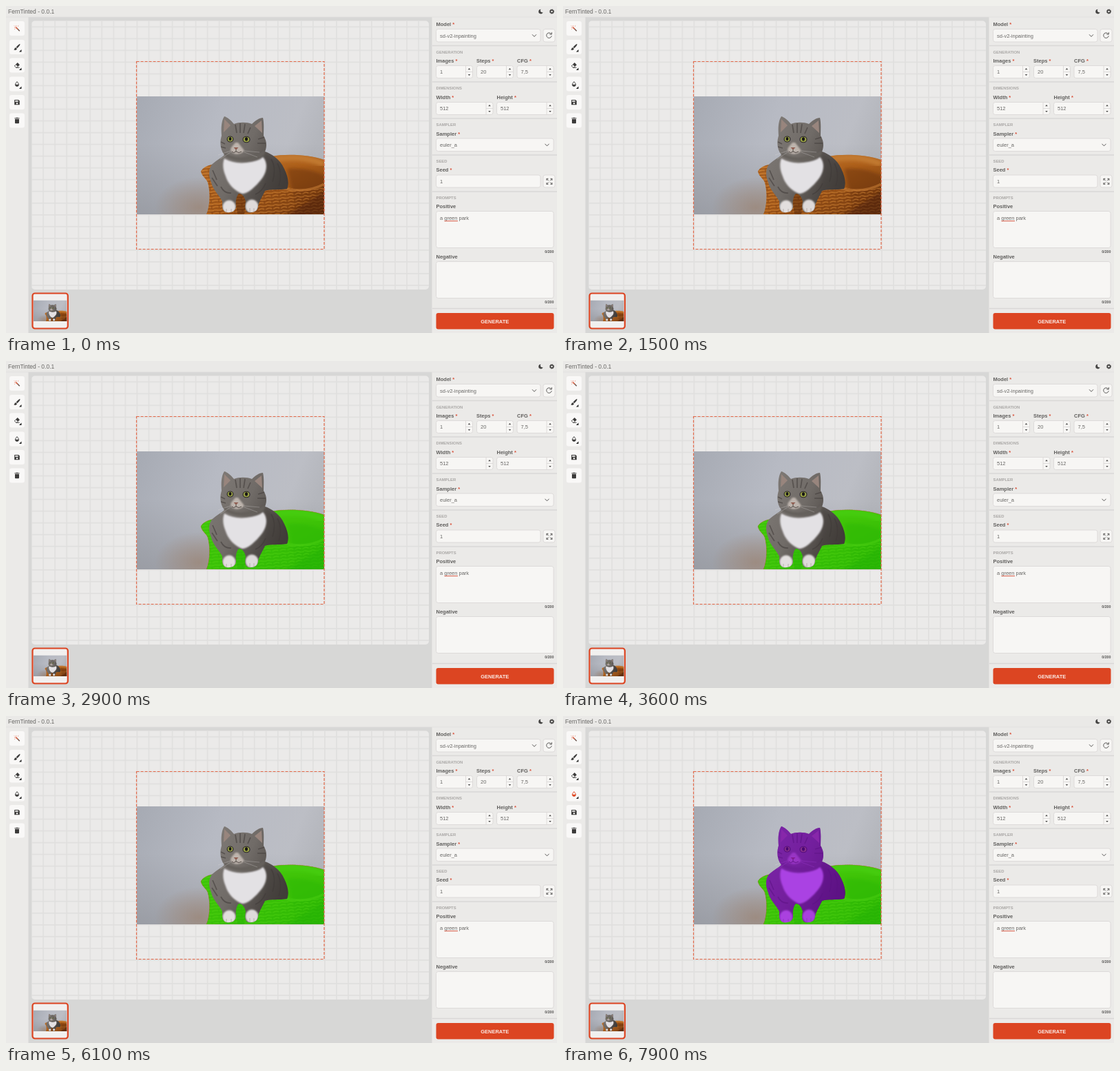
Write an HTML page that moves like this. It is 800 px wide and 474 px high and loops after 8 s.

```html
<!DOCTYPE html>
<html lang="en">
<head>
<meta charset="utf-8">
<title>Mask editor</title>
<style>
html, body { margin: 0; width: 100%; height: 100%; overflow: hidden; background: #ebeae8; }
svg { display: block; width: 100vw; height: 100vh; }
text { font: 7.5px "Liberation Sans", Arial, sans-serif; fill: #696866; }
.b { font-weight: bold; fill: #605f5d; }
.head { font-size: 5.9px; font-weight: bold; fill: #a9a7a5; }
.tiny { font-size: 5.3px; font-weight: bold; fill: #595857; text-anchor: end; }
.small { font-size: 6.4px; }
.mid { text-anchor: middle; }
.star { fill: #d9513a; }
.field { fill: #f7f6f4; stroke: #dbd9d7; stroke-width: .9; }
.line { fill: none; stroke: #5a5958; stroke-width: 1; stroke-linecap: round; stroke-linejoin: round; }
.hot { fill: #dc4522; }
.rule { stroke: #d9d8d6; stroke-width: 1.5; }
.ico { color: #3c3b3a; fill: currentColor; }

/* One loop: 8 s, 1.25% is 100 ms */
.brush, .drop, .popup, .green, .purple, .cursor, .pink, .violet, .lime { animation: 8s linear infinite; }
.brush { animation-name: brush; }
.drop { animation-name: drop; }
.popup { animation-name: popup; }
.green { animation-name: green; animation-timing-function: step-end; }
.purple { animation-name: purple; animation-timing-function: step-end; }
.cursor { animation-name: cursor; animation-timing-function: ease-in-out; }
.pink, .violet, .lime { transform-box: fill-box; transform-origin: center; animation-timing-function: step-end; }
.pink { animation-name: pink; }
.violet { animation-name: violet; }
.lime { animation-name: lime; }
@keyframes brush { 0%, 9% { color: #3c3b3a } 11%, 12.5% { color: #d6481f } 14.5%, 100% { color: #3c3b3a } }
@keyframes drop {
  0%, 46.9% { color: #3c3b3a } 49.5%, 70% { color: #e0451f } 72.5%, 96.25% { color: #3c3b3a } 98.75%, 100% { color: #e0451f }
}
@keyframes popup { 0%, 47% { opacity: 0 } 51%, 70% { opacity: 1 } 72.5%, 100% { opacity: 0 } }
@keyframes green { 0% { visibility: hidden } 35% { visibility: visible } }
@keyframes purple { 0% { visibility: hidden } 85% { visibility: visible } }
@keyframes cursor {
  0%, 20% { opacity: 0; transform: translate(210px, 180px) } 21% { opacity: 1; transform: translate(210px, 180px) }
  27.5%, 32.49% { opacity: 1; transform: translate(427px, 285px) } 32.5%, 100% { opacity: 0; transform: translate(427px, 285px) }
}
@keyframes pink { 0% { transform: none } 57.5% { transform: scale(1.12) } 60%, 100% { transform: none } }
@keyframes violet { 0% { transform: none } 60% { transform: scale(1.08) } 66.25%, 100% { transform: scale(1.14) } }
@keyframes lime { 0% { transform: scale(1.12) } 66.25%, 100% { transform: none } }
</style>
</head>
<body>
<svg viewBox="0 0 800 474" preserveAspectRatio="none">
<defs>
  <pattern id="grid" x="189.5" y="80.5" width="17.03" height="17.03" patternUnits="userSpaceOnUse">
    <path d="M0 .8H17.03M.8 0V17.03" stroke="#e0dfde" stroke-width="1.6"/>
  </pattern>
  <pattern id="weave" width="11" height="9" patternUnits="userSpaceOnUse" patternTransform="rotate(-5)">
    <path d="M0 2Q3 0 6 2T11 2M-3 6.5Q0 4.5 4 6.5T12 6" fill="none" stroke="#c67c33" stroke-width="1.7"/>
    <path d="M0 4.2Q5 3 11 4.2M0 8.5H11M8 0V4" fill="none" stroke="#6b300c" stroke-width="1"/>
  </pattern>
  <linearGradient id="wall" x2="1" y2=".25">
    <stop stop-color="#a6aab3"/><stop offset=".45" stop-color="#b7bac3"/><stop offset=".85" stop-color="#bcbec5"/><stop offset="1" stop-color="#b4b6bc"/>
  </linearGradient>
  <linearGradient id="shade" x2="0" y2="1">
    <stop offset=".4" stop-color="#85878d" stop-opacity="0"/><stop offset="1" stop-color="#85878d" stop-opacity=".5"/>
  </linearGradient>
  <radialGradient id="warm"><stop stop-color="#9b8474" stop-opacity=".75"/><stop offset=".5" stop-color="#9b8474" stop-opacity=".4"/><stop offset="1" stop-color="#9b8474" stop-opacity="0"/></radialGradient>
  <linearGradient id="wicker" x2="1" y2="1">
    <stop stop-color="#c0752c"/><stop offset=".5" stop-color="#ad5f1a"/><stop offset="1" stop-color="#6b340c"/>
  </linearGradient>
  <linearGradient id="fur" x2="1" y2=".6">
    <stop stop-color="#827d79"/><stop offset=".5" stop-color="#706b67"/><stop offset="1" stop-color="#3f3a37"/>
  </linearGradient>
  <filter id="soft" x="-30%" y="-30%" width="160%" height="160%"><feGaussianBlur stdDeviation="2.8"/></filter>
  <filter id="fuzz" x="-20%" y="-20%" width="140%" height="140%"><feGaussianBlur stdDeviation="1.3"/></filter>
  <filter id="cast" x="-20%" y="-20%" width="140%" height="140%"><feDropShadow dx="0" dy="1" stdDeviation="1.5" flood-opacity=".2"/></filter>
  <clipPath id="photoBox"><rect x="190" y="131" width="272" height="171"/></clipPath>

  <path id="rim" d="M302 229C291 231 284 236 283 240C285 248 291 250 293 256C297 270 296 290 291 302H462V223C440 215 405 214 386 218L340 240Z"/>
  <path id="shape" d="M313 188C312 176 313 166 317 160C321 161 327 166 331 171C338 168 350 168 357 171C362 166 368 162 373 162C375 170 374 180 374 188C380 198 378 206 376 211C385 214 398 222 404 236C410 248 411 258 408 265C395 267 385 265 376 268C373 275 368 282 366 290C366 298 358 300 352 299C346 297 347 290 348 283C346 276 343 272 338 272C335 275 333 282 334 290C334 297 328 300 320 299C313 297 314 290 314 283C310 275 300 266 298 256C294 246 294 238 298 231C304 224 312 221 317 216C311 208 310 198 313 188Z"/>
  <clipPath id="catClip"><use href="#shape"/></clipPath>
  <clipPath id="rimClip"><use href="#rim"/></clipPath>

  <g id="scene">
    <rect x="190" y="131" width="272" height="171" fill="url(#wall)"/>
    <rect x="190" y="131" width="272" height="171" fill="url(#shade)"/>
    <ellipse cx="280" cy="292" rx="64" ry="44" fill="url(#warm)"/>
    <use href="#rim" fill="url(#wicker)"/>
    <g clip-path="url(#rimClip)">
      <path d="M385 223Q425 214 462 229" fill="none" stroke="#c27a33" stroke-width="9" filter="url(#soft)"/>
      <path d="M408 236Q440 232 470 250V306H425Z" fill="#6d340d" opacity=".55" filter="url(#soft)"/>
      <path d="M283 232L302 230L302 258L340 265L410 263Q440 270 462 262V302H285Z" fill="url(#weave)" opacity=".6"/>
      <path d="M366 268Q390 262 412 266Q440 270 462 258" fill="none" stroke="#c67c35" stroke-width="3.5" opacity=".6"/>
      <path d="M400 306Q440 285 470 262V306Z" fill="#4f240a" opacity=".6" filter="url(#soft)"/>
      <path d="M332 272H350L346 302H336Z" fill="#4f240a" opacity=".45"/>
    </g>
  </g>
  <g id="cat">
    <use href="#shape" fill="url(#fur)"/>
    <g clip-path="url(#catClip)">
      <path d="M317 164L326 173L316 183ZM371 166L361 174L372 184Z" fill="#98857d"/>
      <path d="M374 212Q382 240 372 268H412Q412 235 374 212Z" fill="#45403d" opacity=".5" filter="url(#soft)"/>
      <path d="M333 172L335 184M340 170L340 184M347 171L345 184M355 176L351 185M366 193L376 190M365 199L377 199M312 197L318 200M312 204L319 206M300 238L306 252M299 249L307 261M385 222Q393 235 387 255M394 228Q402 243 396 261M377 257Q372 269 362 273M312 262Q317 272 327 271" fill="none" stroke="#3f3a37" stroke-width="1.700" opacity=".55"/>
      <path d="M317 221Q331 229 349 227T373 219C381 228 378 240 373 248C364 261 350 273 343 272C334 269 323 260 319 247C315 238 314 229 317 221Z" fill="#e3e1e4" filter="url(#fuzz)"/>
      <path d="M316 211Q338 229 377 209L374 216Q345 232 319 218Z" fill="#65605c" filter="url(#fuzz)"/>
      <path d="M333 198C329 203 324 207 327 211C331 216 341 216 346 210C344 206 339 201 337 198Z" fill="#bdb4ad" filter="url(#fuzz)"/>
      <ellipse cx="324" cy="291.500" rx="9.500" ry="10" fill="#e2dede" filter="url(#fuzz)"/>
      <ellipse cx="357" cy="290.500" rx="9.500" ry="10" fill="#dedada" filter="url(#fuzz)"/>
      <path d="M320 294V299M327 294V299M354 293V299M360 293V299" stroke="#afa5a2" stroke-width=".8"/>
      <path d="M330.500 205H337.500L334 208.500Z" fill="#8f5d50"/>
      <path d="M334 208V211Q330 214 328 211M334 211Q338 214 342 211" fill="none" stroke="#49413d" stroke-width=".9"/>
    </g>
    <g stroke="#2d2a28" stroke-width="1.100" fill="#98a046">
      <ellipse cx="325.500" cy="193" rx="4.400" ry="4"/><ellipse cx="349" cy="193.500" rx="5" ry="4.300"/>
    </g>
    <g fill="#171615"><ellipse cx="325.500" cy="192.500" rx="1.900" ry="2.500"/><ellipse cx="349" cy="193" rx="2.100" ry="2.700"/></g>
    <path d="M326 210L308 216M326 212L311 222M346 210L368 212M346 212L365 219" stroke="#e1dfde" stroke-width=".4" opacity=".7"/>
  </g>

  <rect id="tile" x="-11" y="-10.500" width="22" height="21" rx="3" fill="#f9f8f7"/>
  <path id="more" d="M6.500 7V3.500L3 7Z" fill="#222"/>
  <g id="spin">
    <path d="M0 0V18M0 9H10" stroke="#dbd9d7" stroke-width=".9"/>
    <path d="M3.200 5.800L5 3.600L6.800 5.800ZM3.200 12.400L5 14.600L6.800 12.400Z" fill="#4c4b4a"/>
  </g>
  <path id="chev" class="line" d="M-2.700-1.400L0 1.400L2.700-1.400"/>
  <g id="wand">
    <path d="M-1.200-1.200L3.800 3.800" stroke="#6b554e" stroke-width="1.500"/>
    <path d="M-2-2L1 1" stroke="#e2684a" stroke-width="1.500"/>
    <path d="M-4-1.500H-2.800M-1.300-4.200V-3M1-3L2.200-4M-4-4L-3.300-3.300M-3.600 1.200L-2.700.4" stroke="#e2684a" stroke-width=".8"/>
  </g>
</defs>

<!-- Header and frame -->
<rect width="800" height="474" fill="#d7d7d6"/>
<rect width="800" height="16" fill="#eae9e7"/>
<rect y="16" width="32.500" height="458" fill="#ebeae8"/>
<rect x="618.500" y="16" width="181.500" height="458" fill="#ebeae8"/>
<path d="M0 16H800" stroke="#dfdedc" stroke-width=".8"/>
<text x="3" y="11" style="font-size:8.5px">FernTinted - 0.0.1</text>
<path d="M776.500 4.800A3.300 3.300 0 1 0 779.700 9A2.700 2.700 0 0 1 776.500 4.800Z" fill="#444342"/>
<circle cx="792.500" cy="8" r="2.100" fill="none" stroke="#444342" stroke-width="1.600"/>
<circle cx="792.500" cy="8" r="3.100" fill="none" stroke="#444342" stroke-width="1" stroke-dasharray="1.200 1.235"/>

<!-- Tools -->
<g transform="translate(16 32.500)"><use href="#tile"/><use href="#wand"/></g>
<g transform="translate(16 59.500)"><use href="#tile"/><use href="#more"/>
  <path class="ico brush" d="M4.300-4.300Q3.600-5-1.300.2L.3 1.800Q5.300-3.200 4.300-4.300ZM-1.800.8Q-3.500.8-3.600 2.500Q-3.700 3.600-4.800 3.700Q-2.500 5.200-.8 3.800Q.3 2.800-.3 2.200Z"/></g>
<g transform="translate(16 86)"><use href="#tile"/><use href="#more"/>
  <g class="ico"><path d="M.8-3.900L3.900-.8L1.200 1.900L-1.900-1.200Z"/><path d="M-1.700-1L-3.700 1L-1.400 3.200H.1L1.200 2.100M-1.400 3.300H3.600" fill="none" stroke="currentColor" stroke-width=".9"/></g></g>
<g transform="translate(16 113)"><use href="#tile"/><use href="#more"/>
  <g class="ico drop"><path d="M0-3.400Q-2.600-.4-2.600 1A2.600 2.500 0 0 0 2.600 1Q2.600-.4 0-3.400Z" fill="none" stroke="currentColor" stroke-width=".9"/><path d="M-2.400.7H2.400Q2.200 3.200 0 3.200T-2.400.7Z"/></g></g>
<g transform="translate(16 139.500)"><use href="#tile"/>
  <path class="ico" fill-rule="evenodd" d="M-3.800-3.600H2.200L3.800-2V3.800H-3.800ZM-2.700-2.600V-.8H1.600V-2.600ZM0 .4A1.300 1.300 0 1 0 .1.4Z"/></g>
<g transform="translate(16 166)"><use href="#tile"/>
  <path class="ico" d="M-3.500-3.700H-1.500L-1-4.300H1L1.500-3.700H3.500V-2.700H-3.500ZM-3-2H3V3.300Q3 4.200 2.200 4.200H-2.200Q-3 4.200-3 3.300Z"/></g>

<!-- Canvas -->
<rect x="37" y="21.500" width="577" height="389.500" rx="5" fill="#ebeae9"/>
<rect x="37" y="21.500" width="577" height="389.500" rx="5" fill="url(#grid)"/>
<g clip-path="url(#photoBox)">
  <use href="#scene"/>
  <g class="green">
    <use href="#rim" fill="#12f000" opacity=".7"/>
    <use href="#rim" fill="none" stroke="#b8552a" stroke-width=".8" stroke-dasharray="1 1.500" opacity=".7"/>
  </g>
  <use href="#cat"/>
  <g class="purple">
    <use href="#shape" fill="#dd88ff" style="mix-blend-mode:multiply"/>
    <use href="#shape" fill="#8a00e0" opacity=".45"/>
  </g>
</g>
<rect x="189.500" y="80.500" width="272.500" height="272" fill="none" stroke="#e2694a" stroke-width="1.200" stroke-dasharray="4 2"/>
<g class="cursor"><path d="M-2-2L3 3" stroke="#d8cfc6" stroke-width="1.100"/><path d="M-3 0H-2M0-3V-2M1-1L2-2" stroke="#e2d9d0" stroke-width=".7"/></g>

<!-- Thumbnail -->
<rect x="38.500" y="416.500" width="51.300" height="51" rx="3.500" fill="#f1f0ef" stroke="#dc4522" stroke-width="2.200"/>
<g transform="translate(39.800 426.500) scale(.179) translate(-190 -131)"><g clip-path="url(#photoBox)"><use href="#scene"/><use href="#cat"/></g></g>

<!-- Settings -->
<path class="rule" d="M619 57.500H800M619 110H800M619 163H800M619 216H800M619 269H800M619 438.500H800"/>
<text class="b" x="624.500" y="29">Model <tspan class="star">*</tspan></text>
<rect class="field" x="624.500" y="33.500" width="151.500" height="18.500" rx="3"/>
<text x="630" y="45.500">sd-v2-inpainting</text>
<use href="#chev" x="767" y="43"/>
<rect class="field" x="780" y="33.500" width="17" height="18.500" rx="3"/>
<path class="line" d="M791.700 40.500A3.800 3.800 0 1 0 792.200 43.700M792.300 38.500V41H789.700"/>

<text class="head" x="624.500" y="68.500">GENERATION</text>
<text class="b" x="624.500" y="81.500">Images <tspan class="star">*</tspan></text>
<text class="b" x="683" y="81.500">Steps <tspan class="star">*</tspan></text>
<text class="b" x="742" y="81.500">CFG <tspan class="star">*</tspan></text>
<rect class="field" x="624.500" y="86.500" width="53" height="18" rx="3"/><use href="#spin" x="667.500" y="86.500"/>
<rect class="field" x="683.500" y="86.500" width="53" height="18" rx="3"/><use href="#spin" x="726.500" y="86.500"/>
<rect class="field" x="742" y="86.500" width="53" height="18" rx="3"/><use href="#spin" x="785" y="86.500"/>
<text x="630" y="98.200">1</text><text x="689" y="98.200">20</text><text x="747.500" y="98.200">7,5</text>

<text class="head" x="624.500" y="121.200">DIMENSIONS</text>
<text class="b" x="624.500" y="134.500">Width <tspan class="star">*</tspan></text>
<text class="b" x="712.500" y="134.500">Height <tspan class="star">*</tspan></text>
<rect class="field" x="624.500" y="139.500" width="82.500" height="18" rx="3"/><use href="#spin" x="697" y="139.500"/>
<rect class="field" x="712.500" y="139.500" width="82.500" height="18" rx="3"/><use href="#spin" x="785" y="139.500"/>
<text x="630" y="151.200">512</text><text x="718" y="151.200">512</text>

<text class="head" x="624.500" y="174.200">SAMPLER</text>
<text class="b" x="624.500" y="187.500">Sampler <tspan class="star">*</tspan></text>
<rect class="field" x="624.500" y="192" width="170.500" height="18.500" rx="3"/>
<text x="630" y="204">euler_a</text>
<use href="#chev" x="785.500" y="201.500"/>

<text class="head" x="624.500" y="227.200">SEED</text>
<text class="b" x="624.500" y="240.200">Seed <tspan class="star">*</tspan></text>
<rect class="field" x="624.500" y="245" width="151.500" height="18" rx="3"/>
<text x="630" y="257">1</text>
<rect class="field" x="780" y="245" width="17" height="18" rx="3"/>
<path class="line" d="M785 250.500L787.500 253M785 252.500V250.300H787M792.800 250.500L790.300 253M790.800 250.300H792.800V252.500M785 258.300L787.500 255.800M785 256.300V258.300H787M792.800 258.300L790.300 255.800M790.800 258.300H792.800V256.300"/>

<text class="head" x="624.500" y="280.200">PROMPTS</text>
<text class="b" x="624.500" y="293">Positive</text>
<rect class="field" x="624.500" y="297.500" width="170.500" height="53" rx="3"/>
<text x="630" y="310.200">a green park</text>
<path d="M636.500 311.700H656" stroke="#d4472f" stroke-width=".9"/>
<text class="tiny" x="795.500" y="358.200">0/200</text>
<text class="b" x="624.500" y="366">Negative</text>
<rect class="field" x="624.500" y="370.500" width="170.500" height="53" rx="3"/>
<text class="tiny" x="795.500" y="431.200">0/200</text>
<rect class="hot" x="624.500" y="445" width="171" height="23.500" rx="3"/>
<text class="b mid" x="709.700" y="459.500" style="fill:#fbeae5">GENERATE</text>

<!-- Mask options -->
<g class="popup">
  <rect x="32.500" y="102.500" width="84" height="140.500" rx="5" fill="#efeeec" filter="url(#cast)"/>
  <text class="b small" x="38" y="113.500">Mask opacity</text>
  <text class="b small" x="38" y="135.500">Mask blur</text>
  <text class="b small" x="38" y="157.500">Mask color</text>
  <g fill="#fcfbfa" stroke="#e1e0de" stroke-width=".5">
    <rect x="38" y="121" width="74" height="3.500" rx="1.700"/><rect x="38" y="143" width="74" height="3.500" rx="1.700"/>
    <rect x="71" y="118.700" width="7.500" height="8" rx="1.500"/><rect x="38.500" y="140.700" width="7.500" height="8" rx="1.500"/>
  </g>
  <g stroke="#000" stroke-opacity=".12" stroke-width=".6">
    <circle cx="44" cy="171" r="6.200" fill="#15120f"/><circle cx="59.500" cy="171" r="6.200" fill="#fff"/>
    <circle cx="75" cy="171" r="6.200" fill="#e3200a"/>
    <circle class="lime" cx="90" cy="171" r="5.800" fill="#16f000" stroke="#146010" stroke-opacity="1" stroke-width="1"/>
    <circle cx="105.500" cy="171" r="6.200" fill="#0808f4"/>
    <circle cx="44" cy="186" r="6.200" fill="#fbff00"/><circle cx="59.500" cy="186" r="6.200" fill="#22f8ff"/>
    <circle class="pink" cx="75" cy="186" r="6.200" fill="#f000f0"/><circle cx="90" cy="186" r="6.200" fill="#ffb800"/>
    <circle class="violet" cx="105.500" cy="186" r="6" fill="#8d1ae4" stroke="#6a12b0" stroke-opacity="1"/>
  </g>
  <rect class="hot" x="38" y="197" width="73.500" height="18" rx="3"/>
  <rect x="38" y="220.500" width="73.500" height="18" rx="3" fill="#fbfaf9"/>
  <text class="b small mid" x="74.700" y="208.300" style="fill:#fff">Save mask</text>
  <text class="b small mid" x="74.700" y="231.800" style="fill:#dc4522">Clear mask</text>
</g>
</svg>
</body>
</html>
```
